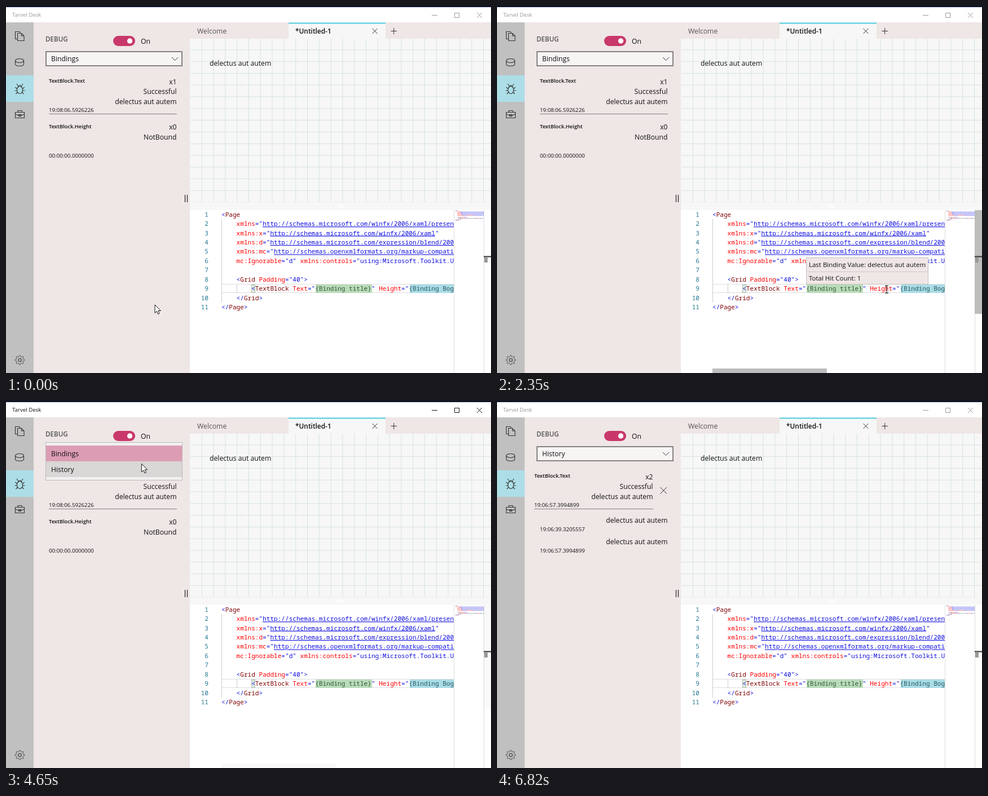
An HTML page that plays this animation: 860x651 px, repeating every 6.92 s.

```html
<!DOCTYPE html>
<html lang="en">
<head>
<meta charset="utf-8">
<title>Binding debugger</title>
<style>
html, body { margin: 0; width: 100%; height: 100%; overflow: hidden; background: #fff; }
svg { display: block; width: 860px; height: 651px; }
text { font: 12.2px "Open Sans", "Noto Sans", sans-serif; white-space: pre; fill: #111; }
.small { font-size: 9.7px; }
.label { font-size: 9.4px; font-weight: 600; }
.tip text { font-size: 11.5px; }
.end { text-anchor: end; }
.code text { font: 11.08px "Noto Sans Mono", "Liberation Mono", monospace; }
.code .num { fill: #237893; text-anchor: end; }
.p { fill: #1010e0; } .tag { fill: #800000; } .attr { fill: #f00; }
.link { fill: #1010e0; text-decoration: underline; }
.good { fill: #35563a; } .bad { fill: #2c5661; }
.line { fill: none; stroke: #333; }
</style>
</head>
<body>
<svg viewBox="0 0 860 651" xmlns="http://www.w3.org/2000/svg">
  <defs>
    <clipPath id="editorClip"><rect x="326" y="361" width="469" height="290"/></clipPath>
    <clipPath id="popupClip"><rect id="popupWindow" x="69" width="246"/></clipPath>
    <pattern id="grid" x="327" y="57.5" width="20.8" height="20.8" patternUnits="userSpaceOnUse">
      <path d="M20.3 0V20.8M0 20.3H20.8" stroke="#d5e3e1" fill="none"/>
    </pattern>
  </defs>

  <!-- window -->
  <rect width="860" height="651" fill="#fff"/>
  <rect width="860" height="2" fill="#0b1230"/>
  <g id="caption">
    <text x="11" y="19.4" class="small" style="fill:inherit">Tarvel Desk</text>
    <path d="M755 16.5h10M795.5 12.5h8v8h-8zM835 12l9 9m0-9l-9 9" fill="none"/>
  </g>

  <!-- side bar -->
  <rect y="29" width="49" height="622" fill="#c0c0c0"/>
  <rect y="123" width="49" height="47" fill="#addee7"/>
  <g class="line" stroke-width="1.1">
    <path d="M20.5 58.500h-4v-13h7l2 2M20.500 48.500h7l4.500 4.500v8.500h-11.500zM27.500 48.500v4.500h4.500"/>
    <ellipse cx="24" cy="97" rx="7.500" ry="3.500"/>
    <path d="M16.500 97v6c0 4.700 15 4.700 15 0v-6"/>
    <ellipse cx="24.500" cy="149" rx="5" ry="6.500"/>
    <path d="M21 144c0-4 7-4 7 0M21 141l-2-3m9 3l2-3M19.500 147l-3-3m3 6h-4m5 3l-3 3M29.500 147l3-3m-3 6h4m-5 3l3 3"/>
    <path d="M16.500 188.500h16v10h-16zM21 188v-2.500h7v2.500M16.500 192l6 2h4l6-2M22.500 192.500h4v3h-4z"/>
    <circle cx="24.500" cy="628" r="2.700"/>
    <path id="gear" stroke="#666"/>
  </g>

  <!-- debug panel -->
  <rect x="49" y="29" width="277" height="622" fill="#efe6e6"/>
  <text x="70" y="62.500" style="font-size:11.600px;font-weight:600;fill:#555">DEBUG</text>
  <rect x="190" y="53" width="39" height="18" rx="9" fill="#c8386b"/>
  <circle cx="219.500" cy="62" r="4.700" fill="#fff"/>
  <text x="239" y="66.500">On</text>
  <rect x="71" y="81" width="241" height="25" fill="#f7f4f4" stroke="#858282" stroke-width="2"/>
  <text x="80" y="98" id="choice"></text>
  <path d="M294 91l5.500 5.500 5.500-5.500" class="line"/>
  <path d="M317.500 335v13M321.500 335v13" stroke="#222" stroke-width="1.200"/>
  <g id="bindings"></g>
  <g id="history"></g>

  <!-- tabs and preview -->
  <rect x="326" y="29" width="534" height="29" fill="#efe6e6"/>
  <rect x="501" y="29" width="172" height="29" fill="#f7f7f7"/>
  <rect x="501" y="29.500" width="172" height="2" fill="#4fcbdc"/>
  <text x="339" y="49" style="font-weight:500;fill:#555">Welcome</text>
  <text x="513" y="49" style="font-size:11.900px;font-weight:600">*Untitled-1</text>
  <path d="M649.500 40l9 9m0-9l-9 9M682.500 44.500h10.500M687.700 39v11" class="line"/>
  <rect x="326" y="58" width="534" height="304" fill="#f7f7f7"/>
  <rect x="327" y="58" width="533" height="290" fill="url(#grid)"/>
  <path d="M587 353.500h12M587 357h12" stroke="#fff" stroke-width="1.500"/>
  <text x="361" y="105.500">delectus aut autem</text>

  <!-- editor -->
  <rect x="326" y="361.500" width="534" height="290" fill="#fff"/>
  <g clip-path="url(#editorClip)">
    <path d="M382 493.500h413M382 508.500h413" stroke="#ddd"/>
    <path d="M382.500 378v148M409.500 493.500v16" stroke="#ccc"/>
    <rect x="549" y="494" width="100" height="15" fill="#b9dcb9"/>
    <rect x="716" y="494" width="79" height="15" fill="#a9dde6"/>
    <rect x="435.500" y="494.500" width="6" height="14" fill="#dceadc" stroke="#b0b8b0"/>
    <g id="code" class="code"></g>
  </g>
  <g id="minimap"></g>
  <path d="M794.500 362v289M847.500 362v289" stroke="#ddd"/>
  <g id="bars" fill="#bdbdbd">
    <rect x="847" y="362" width="13" height="184"/>
    <rect x="382" y="643" width="203" height="8"/>
  </g>
  <rect x="847" y="443.500" width="13" height="2" fill="#333"/>
  <rect x="848" y="446" width="6" height="9" fill="#999"/>

  <!-- hover cards -->
  <g id="valueTip" class="tip">
    <rect x="548.500" y="446.500" width="216" height="47" fill="#efe6e6" stroke="#c6c0c0"/>
    <path d="M549 471.500h215" stroke="#cfc8c8"/>
    <text x="553" y="462.500">Last Binding Value: delectus aut autem</text>
    <text x="553" y="487">Total Hit Count: 1</text>
  </g>
  <g id="idleTip" class="tip">
    <rect x="693.500" y="469.500" width="150" height="24" fill="#efe6e6" stroke="#c6c0c0"/>
    <rect id="tipBar" x="694" y="486" width="141" height="7.500" fill="#bdb9b9"/>
    <text x="698" y="487">Binding not Triggered Yet.</text>
  </g>

  <g id="popup" clip-path="url(#popupClip)">
    <rect x="70.500" y="73.500" width="242" height="67" fill="#f2f0f0" stroke="#bbb"/>
    <rect x="71" y="79" width="241" height="28" fill="#dc9db4"/>
    <rect id="hoverRow" x="71" y="107" width="241" height="28" fill="#dad7d7"/>
    <text x="80" y="98">Bindings</text>
    <text x="80" y="126">History</text>
  </g>

  <path id="arrow" d="M0 0V14.500L3.400 11.400L5.600 16.500L8 15.500L5.800 10.500H10.300Z" fill="#fff" stroke="#111"/>
  <path id="beam" d="M-3-6.500h2.500l.5.500.5-.5H3M-3 6.500h2.500l.5-.5.5.5H3M0-6V6" fill="none" stroke="#222" stroke-width="1.200"/>
</svg>
<script>
const LOOP = 6920;
const $ = id => document.getElementById(id);
const clamp = v => Math.max(0, Math.min(1, v));
const ramp = (t, from, to) => clamp((t - from) / (to - from));
const show = (id, opacity) => $(id).setAttribute('opacity', +opacity);
const escape = s => s.replace(/</g, '&lt;');
const label = (x, y, s, cls = '') => `<text x="${x}" y="${y}" class="${cls}">${s}</text>`;

// One result card of the debug panel.
function card(left, right, top, name, lines, time) {
  return label(left, top, name, 'label') +
    lines.map((s, i) => label(right, top + 2.5 + i * 17.5, s, 'end')).join('') +
    label(left, top + 52, time, 'small');
}
const rule = (from, to) => `<path d="M${from} 191.5H${to}" stroke="#857f7f"/>`;
const value = 'delectus aut autem';

$('bindings').innerHTML =
  card(76, 302.5, 136, 'TextBlock.Text', ['x1', 'Successful', value], '19:08:06.5926226') +
  rule(76, 303) +
  card(76, 302.5, 216.5, 'TextBlock.Height', ['x0', 'NotBound'], '00:00:00.0000000');
$('history').innerHTML =
  card(66, 276.5, 136, 'TextBlock.Text', ['x2', 'Successful', value], '19:06:57.3994899') +
  rule(66, 277) +
  '<path d="M289.500 153l11.500 11.500m0-11.500l-11.500 11.500" class="line"/>' +
  label(302.5, 215.5, value, 'end') + label(76, 230.5, '19:06:39.3205557', 'small') +
  label(302.5, 254, value, 'end') + label(76, 268.5, '19:06:57.3994899', 'small');

// Each line: indent, then class and text in turn.
const schema = 'http://schemas.microsoft.com/';
const source = [
  [0, 'p', '<', 'tag', 'Page'],
  [4, 'attr', 'xmlns', 'p', '="', 'link', schema + 'winfx/2006/xaml/presentation'],
  [4, 'attr', 'xmlns:x', 'p', '="', 'link', schema + 'winfx/2006/xaml', 'p', '"'],
  [4, 'attr', 'xmlns:d', 'p', '="', 'link', schema + 'expression/blend/2008'],
  [4, 'attr', 'xmlns:mc', 'p', '="', 'link', 'http://schemas.openxmlformats.org/markup-compatibility/2006'],
  [4, 'attr', 'mc:Ignorable', 'p', '="d" ', 'attr', 'xmlns:controls', 'p', '="using:Microsoft.Toolkit.Uwp'],
  [0],
  [4, 'p', '<', 'tag', 'Grid ', 'attr', 'Padding', 'p', '="40">'],
  [8, 'p', '<', 'tag', 'TextBlock ', 'attr', 'Text', 'p', '="', 'good', '{Binding title}',
    'p', '" ', 'attr', 'Height', 'p', '="', 'bad', '{Binding Bogus}'],
  [4, 'p', '</', 'tag', 'Grid', 'p', '>'],
  [0, 'p', '</', 'tag', 'Page', 'p', '>']
];
let code = '', minimap = '';
source.forEach(([indent, ...parts], row) => {
  const y = 373.8 + row * 16.42;
  let spans = '', col = indent;
  for (let i = 0; i < parts.length; i += 2) {
    const [cls, s] = [parts[i], parts[i + 1]];
    spans += `<tspan class="${cls}">${escape(s)}</tspan>`;
    const from = 797 + col * .9, to = Math.min(847, from + s.length * .9);
    if (to > from) minimap += `<path class="${cls}" d="M${from} ${363.5 + row * 1.65}H${to}"/>`;
    col += s.length;
  }
  code += label(359, y, row + 1, 'num') + label(382 + indent * 6.65, y, spans);
});
$('code').innerHTML = code;
$('minimap').innerHTML = minimap;
$('minimap').querySelectorAll('path').forEach(p => {
  p.setAttribute('stroke', getComputedStyle(p).fill);
  p.setAttribute('stroke-dasharray', '2 .8');
  p.setAttribute('opacity', .55);
});

// Gear outline: a circle whose radius steps in and out eight times.
$('gear').setAttribute('d', 'M' + Array.from({ length: 32 }, (_, i) => {
  const a = (i - .5) * Math.PI / 16, r = i % 4 < 2 ? 8.3 : 6.2;
  return `${(24.5 + r * Math.cos(a)).toFixed(1)} ${(628 + r * Math.sin(a)).toFixed(1)}`;
}).join('L') + 'Z');

// Pointer stops: time, x, y.
const route = [
  [60, 264, 530], [250, 350, 540], [520, 525, 519], [750, 588, 499], [860, 594.5, 497],
  [2140, 594.5, 497], [2350, 690.5, 502.5], [2440, 731, 507.5],
  [3480, 731, 507.5], [3700, 655, 462], [3930, 470, 355], [4050, 362, 185], [4200, 280, 105], [4270, 262.5, 98],
  [4500, 262.5, 98], [4770, 223, 122], [5420, 223, 122], [5600, 328, 365], [5810, 470, 662]
];
function pointerAt(t) {
  const next = route.findIndex(stop => stop[0] > t);
  if (next === 0) return route[0].slice(1);
  if (next < 0) return route[route.length - 1].slice(1);
  const [t0, x0, y0] = route[next - 1], [t1, x1, y1] = route[next];
  const k = (t - t0) / (t1 - t0);
  return [x0 + (x1 - x0) * k, y0 + (y1 - y0) * k];
}

function draw(t) {
  const [x, y] = pointerAt(t);
  const inEditor = x > 382 && y > 361;
  for (const id of ['arrow', 'beam']) $(id).setAttribute('transform', `translate(${x.toFixed(1)} ${y.toFixed(1)})`);
  show('arrow', !inEditor && t < 5810);
  show('beam', inEditor && t < 5810);

  show('bars', t < 3000 ? ramp(t, 210, 330) : t < 5000 ? 1 - ramp(t, 3930, 4730)
    : ramp(t, 5600, 5700) * (1 - ramp(t, 5790, 6590)));
  show('valueTip', ramp(t, 1140, 1250) * (t < 2430));
  show('idleTip', ramp(t, 2840, 2960) * (t < 3780));
  show('tipBar', ramp(t, 3360, 3480));

  const active = t >= 4440 && t < 6820;
  $('caption').setAttribute('fill', active ? '#111' : '#999');
  $('caption').setAttribute('stroke', 'none');
  $('caption').lastElementChild.setAttribute('stroke', active ? '#111' : '#999');

  const open = 1 - (1 - ramp(t, 4440, 4690)) ** 3;
  $('popupWindow').setAttribute('y', 93 - 20 * open);
  $('popupWindow').setAttribute('height', 28 + 20 * open * 2);
  show('popup', t >= 4440 ? 1 - ramp(t, 4970, 5060) : 0);
  show('hoverRow', t >= 4650);

  const picked = t >= 4970;
  $('choice').textContent = picked ? 'History' : 'Bindings';
  show('bindings', !picked);
  show('history', picked);
}

const start = performance.now();
function tick() {
  draw((performance.now() - start) % LOOP);
  requestAnimationFrame(tick);
}
draw(0);
requestAnimationFrame(tick);
</script>
</body>
</html>
```
